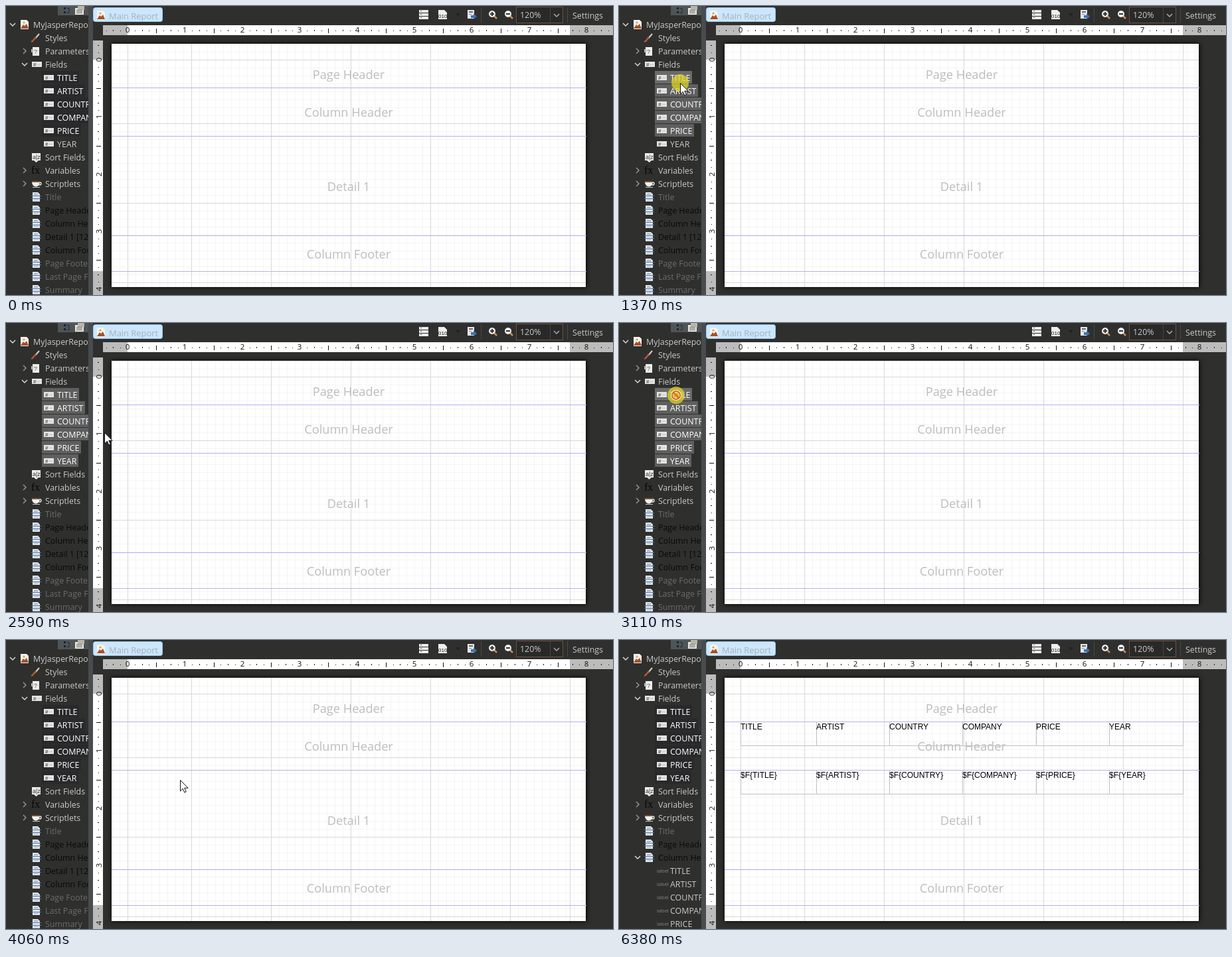
These frames come from a looping animation (914 px wide and 436 px high, 7.39 s). An HTML page with a canvas:

```html
<!DOCTYPE html>
<html lang="en">
<head>
<meta charset="utf-8">
<title>Report designer</title>
<style>
html, body { margin: 0; width: 100%; height: 100%; overflow: hidden; background: #2f2f2d; }
canvas { display: block; }
</style>
</head>
<body>
<canvas id="stage" width="914" height="436"></canvas>
<script>
const g = document.getElementById('stage').getContext('2d');
const LOOP = 7390;
const UI = '"Open Sans", "Noto Sans", sans-serif';
const ARIAL = '"Liberation Sans", Arial, sans-serif';
const BG = '#2f2f2d', SASH = '#484c4e', PALE = '#cacaca', DIM = '#6c6c6c', INK = '#090909';
const FIELDS = ['TITLE', 'ARTIST', 'COUNTRY', 'COMPANY', 'PRICE', 'YEAR'];
const COLS = [183, 297, 407, 517, 628, 738, 849];
const BANDS = [[57, 123], [123, 196], [196, 346], [346, 400]];

function box(x, y, w, h, c) { g.fillStyle = c; g.fillRect(x, y, w, h); }
function frame(x, y, w, h, c) { g.strokeStyle = c; g.lineWidth = 1; g.strokeRect(x + .5, y + .5, w - 1, h - 1); }
function text(s, x, y, c, size = 12.4, family = UI) {
  g.font = size + 'px ' + family;
  g.fillStyle = c;
  g.fillText(s, x, y);
}
function line(points, c, w = 1, close = false) {
  g.beginPath();
  points.forEach(p => g.lineTo(p[0], p[1]));
  if (close) g.closePath();
  g.strokeStyle = c;
  g.lineWidth = w;
  g.stroke();
}
function fill(points, c) {
  g.beginPath();
  points.forEach(p => g.lineTo(p[0], p[1]));
  g.fillStyle = c;
  g.fill();
}
function disc(x, y, r, c) { g.beginPath(); g.arc(x, y, r, 0, 7); g.fillStyle = c; g.fill(); }
function ring(x, y, r, c, w) { g.beginPath(); g.arc(x, y, r, 0, 7); g.strokeStyle = c; g.lineWidth = w; g.stroke(); }

// ---- pointer motion: start, end, from, to, easing, optional bend ----
const out = u => 1 - (1 - u) * (1 - u);
const both = u => (1 - Math.cos(Math.PI * u)) / 2;
const flat = u => u;
const MOVES = [
  [250, 1200, [697, 391], [92, 116], out],
  [1600, 1960, [92, 116], [85, 213], both, [181, 165]],
  [2400, 2800, [85, 213], [79, 112], both, [214, 160]],
  [3010, 3110, [79, 112], [85, 109], out],
  [3110, 3570, [85, 109], [262, 211], out],
  [4130, 4630, [262, 211], [269, 330], both],
  [4760, 4920, [269, 330], [265, 331], flat],
  [4970, 5300, [265, 331], [232, 148], both],
  [5610, 5850, [232, 148], [238, 225], both],
  [6210, 6380, [238, 225], [425, 393], flat]
];
function pointer(t) {
  if (t < 250 || t >= 6380) return null;
  let m = MOVES[0];
  for (const n of MOVES) if (t >= n[0]) m = n;
  const [t0, t1, a, b, ease, bend] = m;
  const u = ease(Math.min(1, (t - t0) / (t1 - t0)));
  const c = bend || [(a[0] + b[0]) / 2, (a[1] + b[1]) / 2];
  const at = i => (1 - u) * (1 - u) * a[i] + 2 * u * (1 - u) * c[i] + u * u * b[i];
  return { x: Math.round(at(0)), y: Math.round(at(1)) };
}
const within = (t, a, b) => t >= a && t < b;
const pressed = t => within(t, 1230, 1440) || within(t, 2260, 2400) || within(t, 3010, 4020);
const isPicked = (i, t) => t < 1440 ? i < 5 : t < 2260 ? i === 0 : true;

// ---- tree ----
function chevron(x, y, open, c) {
  line(open ? [[x - 4, y - 2], [x, y + 2], [x + 4, y - 2]] : [[x - 2, y - 4], [x + 2, y], [x - 2, y + 4]], c, 1.5);
}
function fieldIcon(x, y) {
  box(x, y - 4, 15, 8, '#e4e4e2');
  text('#', x + 2, y + 3, '#222', 8, ARIAL);
  box(x + 8, y, 5, 1, '#c2c2c2');
}
function pictureIcon(x, y) {
  fill([[x - 6, y - 7], [x + 3, y - 7], [x + 6, y - 4], [x + 6, y + 7], [x - 6, y + 7]], '#f3f3f1');
  fill([[x - 6, y + 6], [x - 2, y], [x, y + 2], [x + 3, y - 1], [x + 6, y + 6]], '#a4512b');
  disc(x - 1, y - 3, 1.6, '#e2a03c');
}
function bandIcon(x, y) {
  fill([[x - 5, y - 7], [x + 3, y - 7], [x + 6, y - 4], [x + 6, y + 7], [x - 5, y + 7]], '#dfe5ec');
  box(x - 3, y - 5, 6, 2, '#a3b6cb');
  box(x - 7, y - 2, 15, 1, '#52749f');
  box(x - 7, y + 2, 15, 1, '#52749f');
  box(x - 3, y + 4, 7, 1, '#a3b6cb');
}
function fieldRow(name, x, y, back, ink, alpha = 1) {
  g.font = '12.4px ' + UI;
  const w = g.measureText(name).width + 26;
  if (back) {
    g.globalAlpha = alpha;
    box(x, y - 10, Math.round(w), 19, back);
    g.globalAlpha = 1;
  }
  fieldIcon(x + 3, y);
  text(name, x + 23, y + 5, ink);
}
function smallIcons() {
  pictureIcon(28, 28);
  // brush
  line([[50, 42], [44, 49]], '#d5d0c8', 2);
  line([[45, 47], [40, 53], [38, 54]], '#b05c34', 2.5);
  // parameter sheet
  box(40, 62, 10, 13, '#ececea');
  text('?', 42, 72, '#555', 9, ARIAL);
  box(38, 65, 3, 5, '#b7b7b5');
  fieldIcon(39, 88);
  // sort box
  box(39, 222, 13, 11, '#ededeb');
  fill([[42, 233], [49, 233], [45.5, 236]], '#ededeb');
  text('a|z', 40, 231, '#333', 9, ARIAL);
  text('fx', 38, 253, '#080808', 16, 'italic');
  // cup
  g.beginPath();
  g.ellipse(45, 266, 6, 6.5, 0, 0, Math.PI);
  g.fillStyle = '#f1f1ef';
  g.fill();
  ring(51, 268, 2, '#f1f1ef', 1.3);
  box(39, 264, 12, 2, '#80502f');
  box(40, 273, 11, 1, '#c9c9c7');
}
function tree(t, p, dropped) {
  g.save();
  g.beginPath();
  g.rect(0, 0, 124, 436);
  g.clip();
  box(0, 0, 124, 436, BG);
  box(78, 0, 46, 14, '#4f5456');
  box(87, 2, 3, 3, '#18242f');
  box(87, 8, 3, 3, '#18242f');
  line([[92, 3.5], [95, 3.5], [95, 10.5], [92, 10.5]], '#192b42');
  box(104, 3, 13, 10, '#e6e5e0');
  box(108, 0, 10, 6, '#b9b5a7');
  for (let i = 0; i < 3; i++) box(106, 6 + i * 2, 9, 1, '#777');

  chevron(10, 28, true, '#d6d6d6');
  chevron(28, 68, false, '#929292');
  chevron(28, 88, true, '#d6d6d6');
  chevron(28, 248, false, '#929292');
  chevron(28, 268, false, '#929292');
  smallIcons();
  text('MyJasperReport', 41, 33, PALE);
  text('Styles', 59, 53, PALE);
  text('Parameters', 59, 73, PALE);
  text('Fields', 59, 93, PALE);
  text('Sort Fields', 59, 233, PALE);
  text('Variables', 59, 253, PALE);
  text('Scriptlets', 59, 273, PALE);

  const active = within(t, 1230, 4020);
  FIELDS.forEach((f, i) => {
    const y = 108 + i * 20, on = isPicked(i, t);
    const hover = p && p.x < 124 && p.x > 53 && p.y >= y - 10 && p.y < y + 10;
    let back = null;
    if (on) back = active ? (hover ? '#6b6b6b' : '#5f5f5f') : hover ? '#474747' : '#29292b';
    else if (hover) back = '#464646';
    fieldRow(f, 54, y, back, on || hover ? '#fff' : PALE);
  });

  const rows = dropped ? ['Title', 'Page Header', 'Column Header'] :
    ['Title', 'Page Header', 'Column Header', 'Detail 1 [125px]', 'Column Footer', 'Page Footer', 'Last Page Footer', 'Summary'];
  rows.forEach((r, i) => {
    const y = 288 + i * 20;
    bandIcon(45, y);
    text(r, 59, y + 5, i === 0 || i > 4 ? DIM : INK);
  });
  if (dropped) {
    chevron(28, 328, true, '#d6d6d6');
    FIELDS.slice(0, 5).forEach((f, i) => {
      const y = 348 + i * 20;
      text('label', 57, y + 3, '#85858c', 8, UI);
      text(f, 77, y + 5, PALE);
    });
  }
  g.restore();
  box(124, 0, 7, 436, SASH);
}

// ---- toolbar and rulers ----
function lens(x, plus) {
  line([[x + 3, 15], [x + 7, 19]], '#c98b50', 2.5);
  disc(x, 12, 5, '#eef0f0');
  box(x - 3, 11, 6, 2, '#303030');
  if (plus) box(x - 1, 9, 2, 6, '#303030');
}
function toolbar() {
  box(131, 0, 783, 28, BG);
  g.beginPath();
  g.roundRect(131.5, 2.5, 104, 21, 3);
  g.fillStyle = '#cce6fc';
  g.fill();
  g.strokeStyle = '#91c9f7';
  g.lineWidth = 1;
  g.stroke();
  pictureIcon(143, 14);
  text('Main Report', 155, 20, '#a6b0b8', 12.9);

  for (let i = 0; i < 3; i++) { box(622, 6 + i * 5, 14, 4, '#eeeeec'); box(624, 7 + i * 5, 2, 1, '#555'); }
  fill([[651, 6], [660, 6], [664, 10], [664, 20], [651, 20]], '#efefed');
  text('010', 651, 18, '#222', 8, ARIAL);
  fill([[677, 11], [684, 11], [680.5, 15]], '#202020');
  box(695, 6, 10, 13, '#e7e9eb');
  box(697, 8, 6, 2, '#667');
  box(697, 12, 4, 1, '#889');
  fill([[700, 14], [704, 14], [704, 11], [709, 16], [704, 20], [704, 18], [700, 18]], '#3c73af');
  box(715, 2, 1, 23, '#494947');
  lens(732, true);
  lens(756, false);
  box(768, 1, 71, 25, '#292928');
  frame(768, 1, 71, 25, '#6e5140');
  box(819, 2, 1, 23, '#484543');
  text('120%', 774, 18, PALE);
  chevron(829, 14, true, '#aaa');
  box(845, 2, 1, 23, '#494947');
  text('Settings', 853, 19, PALE);
}
function rulers() {
  const step = 86.4, gray = '#bcbcbc';
  box(146, 29, 768, 15, gray);
  box(183, 29, 666, 15, '#fff');
  box(131, 52, 15, 384, gray);
  box(131, 81, 15, 319, '#fff');
  for (let k = -3; k < 68; k++) {
    const x = Math.round(183 + k * step / 8), y = Math.round(81 + k * step / 8);
    const part = ((k % 8) + 8) % 8;
    const len = part === 4 ? 7 : part % 2 ? 1 : 2;
    if (part) {
      const off = Math.floor(len / 2);
      box(x, 37 - off, 1, len, '#111');
      if (y > 53 && y < 435) box(139 - off, y, len, 1, '#111');
    } else {
      g.textAlign = 'center';
      text(String(k / 8), x, 40, '#111', 11.5);
      if (y < 430) {
        g.save();
        g.translate(145, y);
        g.rotate(-Math.PI / 2);
        text(String(k / 8), 0, -1, '#111', 11.5);
        g.restore();
      }
      g.textAlign = 'left';
    }
  }
}

// ---- report page ----
function page(dropped) {
  box(131, 28, 783, 408, BG);
  g.save();
  g.shadowColor = '#000';
  g.shadowBlur = 7;
  box(159, 57, 715, 367, '#111');
  g.restore();
  box(159, 57, 714, 367, '#fff');
  for (let x = 171; x < 873; x += 12) box(x, 57, 1, 367, '#f4f4f4');
  for (let y = 69; y < 424; y += 12) box(159, y, 714, 1, '#f4f4f4');
  for (let x = 279; x < 873; x += 120) box(x, 57, 1, 367, '#d8d8d8');
  for (let y = 177; y < 424; y += 120) box(159, y, 714, 1, '#d8d8d8');
  box(183, 57, 1, 367, '#d8d8d8');
  box(849, 57, 1, 367, '#d8d8d8');
  box(159, 81, 714, 1, '#d8d8d8');
  BANDS.forEach(b => box(159, b[1], 715, 1, '#b1b1fa'));
  g.textAlign = 'center';
  [['Page Header', 110], ['Column Header', 167], ['Detail 1', 279], ['Column Footer', 381]]
    .forEach(b => text(b[0], 516, b[1], '#bdbdbd', 18.2));
  g.textAlign = 'left';
  if (!dropped) return;
  FIELDS.forEach((f, i) => {
    [[f, 123], ['$F{' + f + '}', 196]].forEach(([s, y]) => {
      box(COLS[i], y, 1, 37, '#c0c0c0');
      box(COLS[i + 1], y, 1, 37, '#c0c0c0');
      box(COLS[i], y + 36, COLS[i + 1] - COLS[i], 1, '#c0c0c0');
      text(s, COLS[i], y + 12, '#000', 12, ARIAL);
    });
  });
}
function hoverCell(p) {
  [123, 196].forEach(y => {
    if (p.y < y || p.y > y + 36) return;
    for (let i = 0; i < 6; i++)
      if (p.x >= COLS[i] && p.x < COLS[i + 1]) frame(COLS[i], y, COLS[i + 1] - COLS[i] + 1, 37, '#6464ee');
  });
}
function dropBand(p) {
  const b = BANDS.find(b => p.y >= b[0] && p.y < b[1]);
  if (!b || p.x < 159) return;
  g.strokeStyle = '#4646ec';
  g.lineWidth = 1.5;
  g.strokeRect(159.75, b[0] + .5, 714, b[1] - b[0] + .5);
}
function ghost(p) {
  const x = p.x - 25, y = p.y - 14;
  g.save();
  g.beginPath();
  g.rect(x, y, 68, 120);
  g.clip();
  FIELDS.forEach((f, i) => fieldRow(f, x, y + 10 + i * 20, '#606060', '#fff', .5));
  g.restore();
}

// ---- overlays ----
function tooltip() {
  box(89, 219, 44, 39, 'rgba(0,0,0,.35)');
  box(87, 216, 43, 39, '#2b2b2b');
  frame(87, 216, 43, 39, '#747474');
  text('Field', 93, 232, '#fff');
  text('YEAR', 93, 249, '#fff');
}
function arrow(x, y) {
  const shape = [[0, 0], [0, 16.5], [3.8, 12.8], [6.3, 18.5], [8.8, 17.4], [6.3, 11.8], [11.6, 11.8]]
    .map(q => [x + .5 + q[0], y + .5 + q[1]]);
  fill(shape, '#fff');
  line(shape, '#111', 1, true);
}
function forbid(x, y) {
  ring(x, y, 6, '#fff1c8', 4);
  ring(x, y, 6, '#dd6719', 2);
  line([[x - 4, y - 4], [x + 4, y + 4]], '#dd6719', 2);
}
function overlay(t, p) {
  const drag = within(t, 3060, 4020);
  if (pressed(t)) disc(p.x, p.y, 13, 'rgba(222,214,38,.74)');
  if (drag && p.x < 159) forbid(p.x, p.y);
  else arrow(p.x, p.y);
  if (drag && p.x >= 159) {
    g.beginPath();
    g.roundRect(p.x + 10.5, p.y + 18.5, 7, 8, 1.5);
    g.fillStyle = '#fff';
    g.fill();
    g.strokeStyle = '#222';
    g.lineWidth = 1;
    g.stroke();
    box(p.x + 12, p.y + 22, 4, 1, '#222');
    box(p.x + 13.5, p.y + 20.5, 1, 4, '#222');
  }
}

function draw(t) {
  const p = pointer(t), dropped = t >= 4090;
  page(dropped);
  toolbar();
  rulers();
  tree(t, p, dropped);
  if (!p) return;
  if (dropped) hoverCell(p);
  if (within(t, 3110, 4020)) {
    dropBand(p);
    if (p.x > 95) ghost(p);
  }
  if (within(t, 1990, 2260)) tooltip();
  overlay(t, p);
}

const begin = performance.now();
function tick() {
  draw((performance.now() - begin) % LOOP);
  requestAnimationFrame(tick);
}
tick();
</script>
</body>
</html>
```
